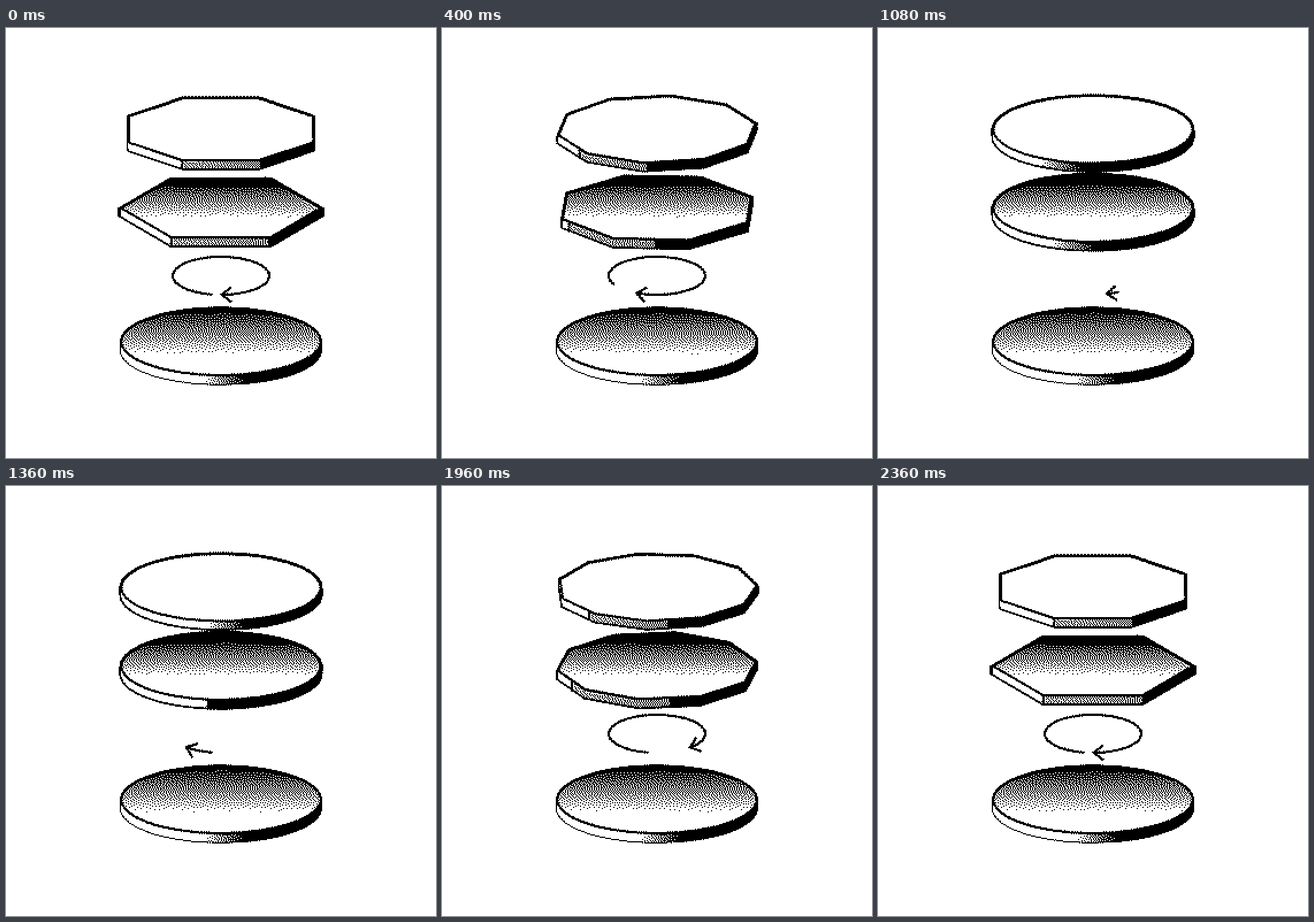
Recreate the animation shown at these times as an HTML page with a canvas. Size 748x748 px, loop 2400 ms.

```html
<!DOCTYPE html>
<html lang="en">
<head>
<meta charset="utf-8">
<title>Spinning slabs</title>
<style>
  html, body { margin: 0; height: 100%; overflow: hidden; background: #fff; }
  canvas { display: block; width: 100vw; height: 100vh; image-rendering: pixelated; }
</style>
</head>
<body>
<canvas id="stage" width="374" height="374"></canvas>
<script>
const SIZE = 374, LOOP = 2400, STEP = 40, TURN = 1140;
const CX = 374, RX = 173.5, RY = 58.5, MAX_SIDES = 40;
const ctx = document.getElementById('stage').getContext('2d', { willReadFrequently: true });
const tone = new Float32Array(SIZE * (SIZE + 1) + 2);

const rad = deg => deg * Math.PI / 180;
const clamp = (v, lo = 0, hi = 1) => Math.min(hi, Math.max(lo, v));
const mix = (a, b, k) => a + (b - a) * k;
const ease = (t, from, to) => (1 - Math.cos(Math.PI * clamp((t - from) / (to - from)))) / 2;
const rimX = deg => CX + RX * Math.cos(rad(deg));
const grey = v => `rgb(${[v, v, v].map(c => Math.round(c * 255))})`;

// Each key: time, angle where black starts, angle where white starts
const TOP_LIGHT = [[0, 67, 113], [210, 67, 113], [400, 96, 141], [600, 76, 100], [900, 76, 100],
  [1080, 96, 123], [1250, 76, 100], [1600, 76, 96], [1960, 84, 133], [2200, 67, 113], [2400, 67, 113]];
const MID_LIGHT = [[0, 60, 120], [210, 60, 120], [400, 91, 152], [600, 75, 100], [900, 75, 100],
  [1080, 88, 115], [1250, 76, 100], [1600, 73, 104], [1960, 83, 149], [2200, 60, 120], [2400, 60, 120]];

function sample(keys, t) {
  const i = Math.max(1, keys.findIndex(k => k[0] > t));
  const a = keys[i - 1], b = keys[i], k = (t - a[0]) / (b[0] - a[0]);
  return [mix(a[1], b[1], k), mix(a[2], b[2], k)];
}

function outline(s, dy) {
  ctx.beginPath();
  for (let i = 0; i < s.sides; i++) {
    const a = rad(s.start + 360 * i / s.sides);
    ctx.lineTo(CX + RX * Math.cos(a), s.y + dy + RY * Math.sin(a));
  }
  ctx.closePath();
}

function sideFill([dark, light], soft) {
  const g = ctx.createLinearGradient(CX - RX, 0, CX + RX, 0);
  const stop = (deg, v) => g.addColorStop(clamp((rimX(deg) - CX + RX) / (2 * RX)), grey(v));
  stop(180, 1);
  stop(light, 1);
  stop(light, mix(0.64, 1, soft));
  stop(dark, mix(0.52, 0, soft));
  stop(dark, 0);
  stop(0, 0);
  return g;
}

function slab(s) {
  const layers = draw => { for (let d = 0; d <= s.depth; d += 0.5) { outline(s, d); draw(); } };
  ctx.strokeStyle = '#000';
  ctx.lineWidth = s.rim;
  layers(() => ctx.stroke());
  ctx.fillStyle = sideFill(s.light, s.soft);
  layers(() => ctx.fill());

  if (s.band) {
    const [a, b] = s.band.map(d => clamp(d, 0, 180));
    if (b > a) {
      ctx.save();
      ctx.beginPath();
      ctx.rect(rimX(b) - 3, s.y, rimX(a) - rimX(b) + 3, RY + s.depth + 4);
      ctx.clip();
      ctx.fillStyle = '#000';
      layers(() => ctx.fill());
      ctx.restore();
    }
  }
  if (s.soft < 0.3) {
    const x = rimX(s.light[1]), y = s.y + RY * Math.sin(rad(s.light[1]));
    line([[x, y - 3], [x, y + s.depth]], 3.5);
  }

  let face = '#fff';
  if (s.shade) {
    face = ctx.createLinearGradient(0, s.shade[0], 0, s.shade[1]);
    face.addColorStop(0, '#000');
    face.addColorStop(1, '#fff');
  }
  outline(s, 0);
  ctx.fillStyle = face;
  ctx.fill();
  ctx.lineWidth = 4;
  ctx.stroke();
}

function line(points, width) {
  ctx.beginPath();
  points.forEach(p => ctx.lineTo(...p));
  ctx.lineWidth = width;
  ctx.stroke();
}

// Angles run clockwise from the front of the ring
function arrow(tail, head) {
  const at = deg => [CX - 84 * Math.sin(rad(deg)), 431 + 33 * Math.cos(rad(deg))];
  const arc = [];
  for (let i = 0; i <= 90; i++) arc.push(at(mix(tail, head, i / 90)));
  line(arc, 4.3);
  const [x, y] = at(head);
  const back = Math.atan2(33 * Math.sin(rad(head)), 84 * Math.cos(rad(head)));
  const wing = turn => [x + 21 * Math.cos(back + rad(turn)), y + 21 * Math.sin(back + rad(turn))];
  line([wing(-38), [x, y], wing(38)], 4.3);
}

// Reduce the drawing to black and white stipple
function stipple() {
  const img = ctx.getImageData(0, 0, SIZE, SIZE), px = img.data;
  tone.fill(0);
  for (let i = 0; i < SIZE * SIZE; i++) tone[i] = px[i * 4];
  for (let i = 0; i < SIZE * SIZE; i++) {
    const v = tone[i] < 128 ? 0 : 255, err = (tone[i] - v) / 16;
    px[i * 4] = px[i * 4 + 1] = px[i * 4 + 2] = v;
    tone[i + 1] += err * 7;
    tone[i + SIZE - 1] += err * 3;
    tone[i + SIZE] += err * 5;
    tone[i + SIZE + 1] += err;
  }
  ctx.putImageData(img, 0, 0);
}

function draw(t) {
  const first = t < TURN;
  const e = first ? ease(t, 230, 1212) : ease(t, TURN, 2200);
  const round = first ? e : 1 - e;
  const spin = 360 * e;
  const soft = clamp((round - 0.1) * 4);
  const sides = n => Math.floor(n + (MAX_SIDES - n) * round + 1e-6);
  const topSides = sides(8);

  ctx.setTransform(0.5, 0, 0, 0.5, 0, 0);
  ctx.fillStyle = '#fff';
  ctx.fillRect(0, 0, 748, 748);
  slab({
    y: 545.5, depth: 15.5, rim: 4, sides: 90, start: 0, soft: 1,
    light: [76, 101], shade: [490, 569]
  });
  slab({
    y: 313.5, depth: 14, rim: 6.5, sides: sides(6), start: spin, soft,
    light: sample(MID_LIGHT, t), band: [spin - 42, spin + 60], shade: [269, 331]
  });
  slab({
    y: 176.5, depth: 13.5, rim: 6.5, sides: topSides, start: 90 + 180 / topSides + spin, soft,
    light: sample(TOP_LIGHT, t), band: [spin - 47, spin]
  });
  if (first) arrow(10 + 709 * e, 359 + 360 * e);
  else arrow(10, 10 + 349 * e);
  stipple();
}

let last = -1;
function tick() {
  const step = Math.floor(performance.now() % LOOP / STEP);
  if (step !== last) draw((last = step) * STEP);
  requestAnimationFrame(tick);
}
tick();
</script>
</body>
</html>
```
